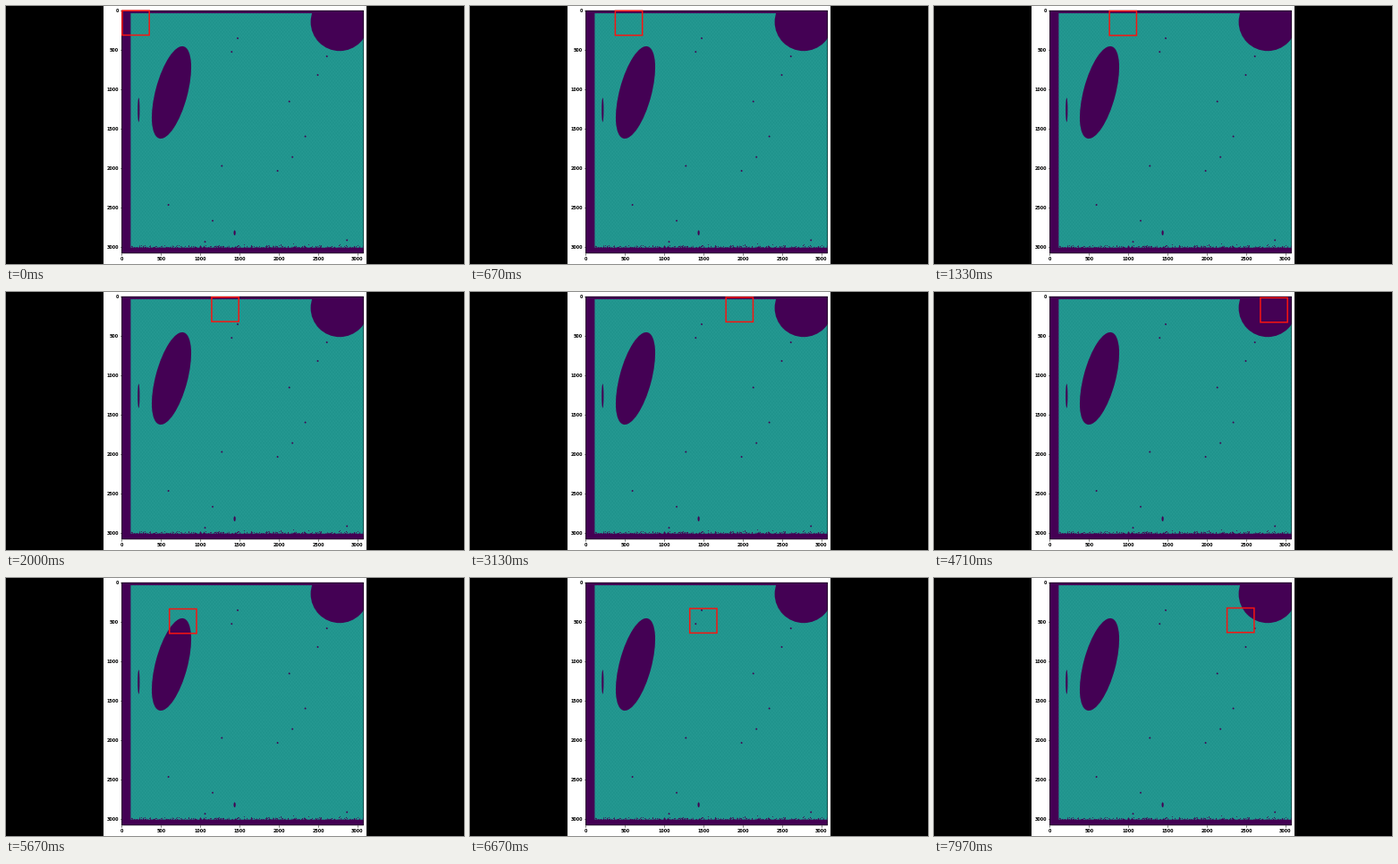
Recreate the animation shown at these times as a matplotlib script. Size 512 by 288 pixels, loop 8 s.

```python
import numpy as np
import matplotlib.pyplot as plt
from matplotlib.animation import FuncAnimation
from matplotlib.patches import Circle, Ellipse, Rectangle

W, H, DPI = 512, 288, 72
FRAMES, STEP = 320, 25
PURPLE, TEAL = "#440154", (34, 150, 143)
LEFT, RIGHT, TOP, BOTTOM = 129.4, 399.7, 5.1, 276.0
SHEET_LEFT, SHEET_TOP, SHEET_BOTTOM = 139.4, 8.1, 269.8
SCALE = 0.0878  # pixels per data unit

rng = np.random.default_rng(4)
plt.rcParams["font.family"] = "DejaVu Sans"
fig = plt.figure(figsize=(W / DPI, H / DPI), dpi=DPI, facecolor="black")
ax = fig.add_axes([0, 0, 1, 1])
ax.axis("off")


def box(x0, y0, x1, y1, **style):
    style = {"lw": 0, "snap": False, **style}
    return ax.add_patch(Rectangle((x0, y0), x1 - x0, y1 - y0, **style))


box(109, 0, 403, H, fc="white")
plot = box(LEFT, TOP, RIGHT, BOTTOM, fc=PURPLE)


def hole(shape, *args, **kwargs):
    patch = ax.add_patch(shape(*args, fc=PURPLE, lw=0, **kwargs))
    patch.set_clip_path(plot)


# teal sheet with a faint woven texture
rows, cols = np.mgrid[0:264, 0:264]
weave = 4 * np.sin(cols * 1.9) * np.sin(rows * 1.55)
pixels = (np.array(TEAL) + weave[..., None]).astype(np.uint8)
sheet = ax.imshow(pixels, extent=(138, 402, 271, 7), aspect="auto",
                  interpolation="nearest", zorder=1)
sheet.set_clip_path(plot)
box(LEFT, TOP, SHEET_LEFT, BOTTOM, fc=PURPLE)
box(LEFT, TOP, RIGHT, SHEET_TOP, fc=PURPLE)
box(LEFT, SHEET_BOTTOM, RIGHT, BOTTOM, fc=PURPLE)

# ragged lower edge
edge_x = np.arange(SHEET_LEFT, RIGHT, 0.7)
edge_y = SHEET_BOTTOM - np.minimum(rng.exponential(0.7, edge_x.size), 3)
ax.fill_between(edge_x, edge_y, SHEET_BOTTOM + 0.5, step="mid",
                color=PURPLE, lw=0, zorder=2)
ax.scatter(rng.uniform(SHEET_LEFT, RIGHT, 120),
           SHEET_BOTTOM - 1 - rng.exponential(0.9, 120),
           s=0.6, c=PURPLE, lw=0, zorder=2)

# large holes, then specks
hole(Circle, (373, 17.8), 32.4)
hole(Ellipse, (185, 96.5), 106.2, 35.8, angle=-75.15)
hole(Ellipse, (148.3, 116), 2.2, 27)
hole(Ellipse, (255.6, 253.2), 2.2, 5.6)
for spot in [(259, 36), (252.3, 51.2), (358.7, 56.2), (348.5, 77),
             (316.7, 106.6), (334.6, 145.6), (320.2, 168.6), (303.6, 184),
             (241.3, 178.5), (181.6, 222), (231, 239.7), (222.5, 263.2),
             (381.2, 261.4)]:
    hole(Circle, spot, 0.95)

# frame, ticks and labels
box(LEFT, TOP, RIGHT, BOTTOM, fill=False, ec="black", lw=0.5)
text = dict(fontsize=4.9, weight="bold", color="black", va="center")
for value in range(0, 3001, 500):
    x, y = LEFT + value * SCALE, TOP + 0.2 + value * SCALE
    ax.plot([x, x], [BOTTOM, BOTTOM + 1.8], color="black", lw=0.5)
    ax.plot([LEFT - 1.8, LEFT], [y, y], color="black", lw=0.5)
    ax.text(x, 282.3, str(value), ha="center", **text)
    ax.text(126, y + 0.4, str(value), ha="right", **text)

window = box(0, 0, 30.3, 27.3, fill=False, ec="#fa1410", lw=1.5, zorder=5)
ax.set_xlim(0, W)
ax.set_ylim(H, 0)

# each row is one steady sweep: start time, start point, velocity per second
SWEEPS = [(0, (129.9, 5.2), (50, 0.27)),
          (4.82, (130.4, 34.9), (63, -0.45))]


def update(i):
    t = i * STEP / 1000
    start, origin, velocity = SWEEPS[t >= SWEEPS[1][0]]
    window.set_xy(np.array(origin) + np.array(velocity) * (t - start))
    return (window,)


anim = FuncAnimation(fig, update, frames=FRAMES, interval=STEP,
                     repeat=True, repeat_delay=0, blit=False)
plt.show()
```
